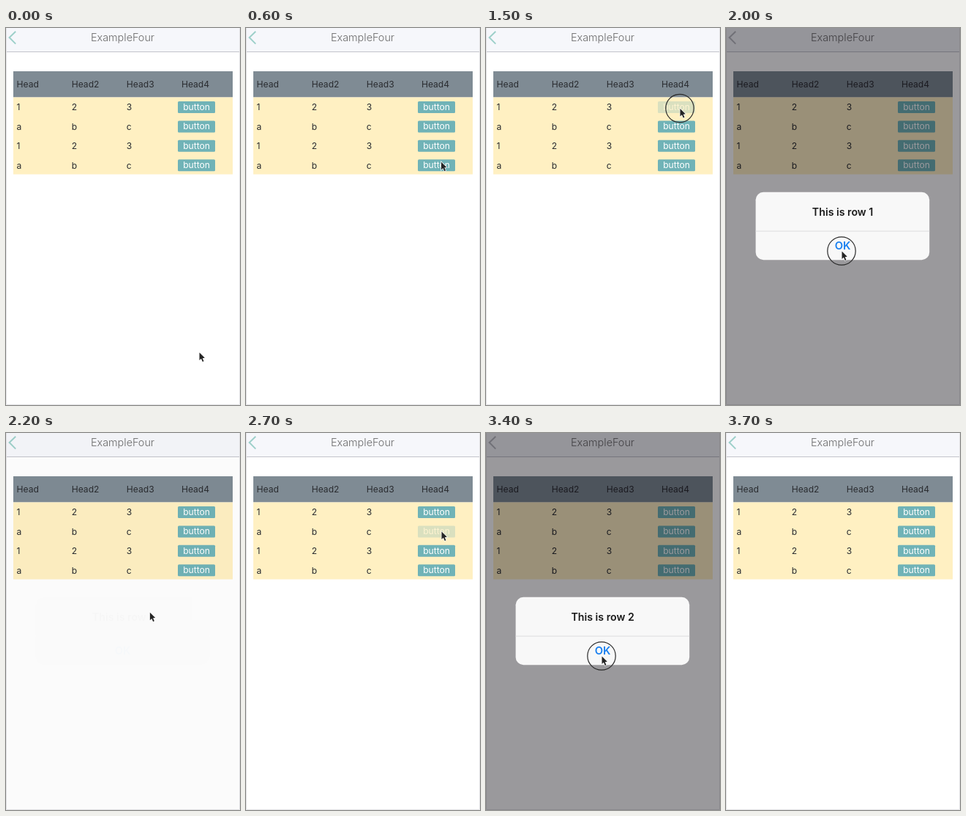
Animation, 320 px wide and 514 px high, one loop 3800 ms. Source, as an HTML page:

```html
<!DOCTYPE html>
<html lang="en">
<head>
<meta charset="utf-8">
<title>ExampleFour</title>
<style>
  html, body { margin: 0; width: 100%; height: 100%; overflow: hidden; background: #fff; }
  svg { display: block; width: 100vw; height: 100vh; }
  text { font-family: Inter, Roboto, "Open Sans", sans-serif; font-size: 12.1px; fill: #2a2c30; }
  .title { font-size: 14.4px; font-weight: 300; fill: #6c6c6c; text-anchor: middle; }
  .label { fill: #fff; text-anchor: middle; }
  .message { font-size: 14.2px; font-weight: 600; fill: #1a1a1a; text-anchor: middle; }
  .ok { font-size: 14.8px; font-weight: 600; fill: #1a80f0; text-anchor: middle; }
</style>
</head>
<body>
<svg viewBox="0 0 320 514" preserveAspectRatio="none">
  <rect width="320" height="514" fill="#fff"/>
  <rect width="320" height="32" fill="#f6f7fb"/>
  <rect y="32" width="320" height="1" fill="#c3c4cb"/>
  <path id="back" d="M13.2 4.8 4.6 13l8.6 8.6" fill="none" stroke-width="2"/>
  <text class="title" x="159.5" y="18.3">ExampleFour</text>
  <rect x="10" y="59" width="300" height="35.5" fill="#7f8b94"/>
  <rect x="10" y="94.5" width="300" height="105" fill="#fff0c2"/>
  <g id="table"></g>
  <path d="M.5 0V513.5H319.5V0" fill="none" stroke="#e4e4e6"/>
  <rect id="dim" width="320" height="514" fill="#030208"/>
  <g id="alert">
    <rect x="40.6" y="223.8" width="237.6" height="92.4" rx="10.5" fill="#f8f8f8"/>
    <rect x="40.6" y="276.5" width="237.6" height="1" fill="#dedee0"/>
    <text id="message" class="message" x="159.6" y="256"></text>
    <text class="ok" x="159.6" y="302.2">OK</text>
  </g>
  <g id="pointer">
    <circle id="ring" r="19.2" fill="none" stroke="#2a2a2a" stroke-width="1.2"/>
    <path d="M.5.6V11L2.9 8.8 4.8 13 6.5 12.2 4.7 8.2 7.8 7.8Z" fill="#242424"
          stroke="#fff" stroke-width="1.6" stroke-opacity=".8" paint-order="stroke"/>
  </g>
</svg>
<script>
const $ = id => document.getElementById(id);
const LOOP = 3800, STEP = 100;

function add(parent, tag, attrs, text) {
  const el = document.createElementNS("http://www.w3.org/2000/svg", tag);
  for (const k in attrs) el.setAttribute(k, attrs[k]);
  if (text) el.textContent = text;
  parent.append(el);
  return el;
}

function addRow(cells, y) {
  cells.forEach((s, i) => add($("table"), "text", { x: 14.6 + i * 75.1, y }, s));
}

addRow(["Head", "Head2", "Head3", "Head4"], 81.3);
const buttons = ["123", "abc", "123", "abc"].map((row, r) => {
  const mid = 108 + r * 26.4;
  addRow([...row], mid + 4.3);
  const g = add($("table"), "g", {});
  add(g, "rect", { x: 235, y: mid - 8, width: 51, height: 16, rx: 1.5, fill: "#70b3b7" });
  add(g, "text", { class: "label", x: 260.6, y: mid + 4 }, "button");
  return g;
});

// Pointer stops: ms, x, y
const stops = [
  [0, 264, 442], [800, 267, 134], [1300, 265, 109.5], [1700, 265, 109.5],
  [2000, 158, 304], [2500, 267, 134], [2900, 267, 134], [3300, 158, 304], [LOOP, 158, 304]
];
// A button is tapped, its alert opens, and OK closes it.
const rounds = [{ row: 0, tap: 1500, ok: 2000 }, { row: 1, tap: 2600, ok: 3400 }];
const EXIT = 3600;

const clamp = v => Math.min(1, Math.max(0, v));
const smooth = u => u * u * (3 - 2 * u);

function pointerAt(t) {
  const i = stops.findIndex(s => s[0] > t);
  const [t0, x0, y0] = stops[i - 1], [t1, x1, y1] = stops[i];
  const k = smooth((t - t0) / (t1 - t0));
  return [x0 + (x1 - x0) * k, y0 + (y1 - y0) * k];
}

function draw(ms) {
  const t = Math.floor(ms % LOOP / STEP) * STEP;
  const { row, tap, ok } = rounds[t < 2500 ? 0 : 1];
  const enter = 1 - (1 - clamp((t - tap - 100) / 200)) ** 2;
  const shown = enter * (1 - clamp((t - ok) / 300)) ** 3;
  const [x, y] = pointerAt(t);

  $("pointer").setAttribute("transform", `translate(${x} ${y})`);
  $("pointer").setAttribute("visibility", t < EXIT ? "visible" : "hidden");
  $("ring").setAttribute("opacity", t === tap || t === ok ? 1 : 0);
  $("dim").setAttribute("opacity", shown * .4);
  $("back").setAttribute("stroke", shown > .5 ? "#b9bbc0" : "#9ed0ca");
  $("alert").setAttribute("opacity", shown ** 1.3);
  $("alert").setAttribute("transform",
    `translate(160 270) scale(${1.15 - .15 * enter}) translate(-160 -270)`);
  $("message").textContent = `This is row ${row + 1}`;
  const held = t >= tap && t <= tap + 100;
  buttons.forEach((b, i) => b.setAttribute("opacity", held && i === row ? .25 : 1));
}

const start = performance.now();
function tick(now) {
  draw(Math.max(0, now - start));
  requestAnimationFrame(tick);
}
draw(0);
requestAnimationFrame(tick);
</script>
</body>
</html>
```
